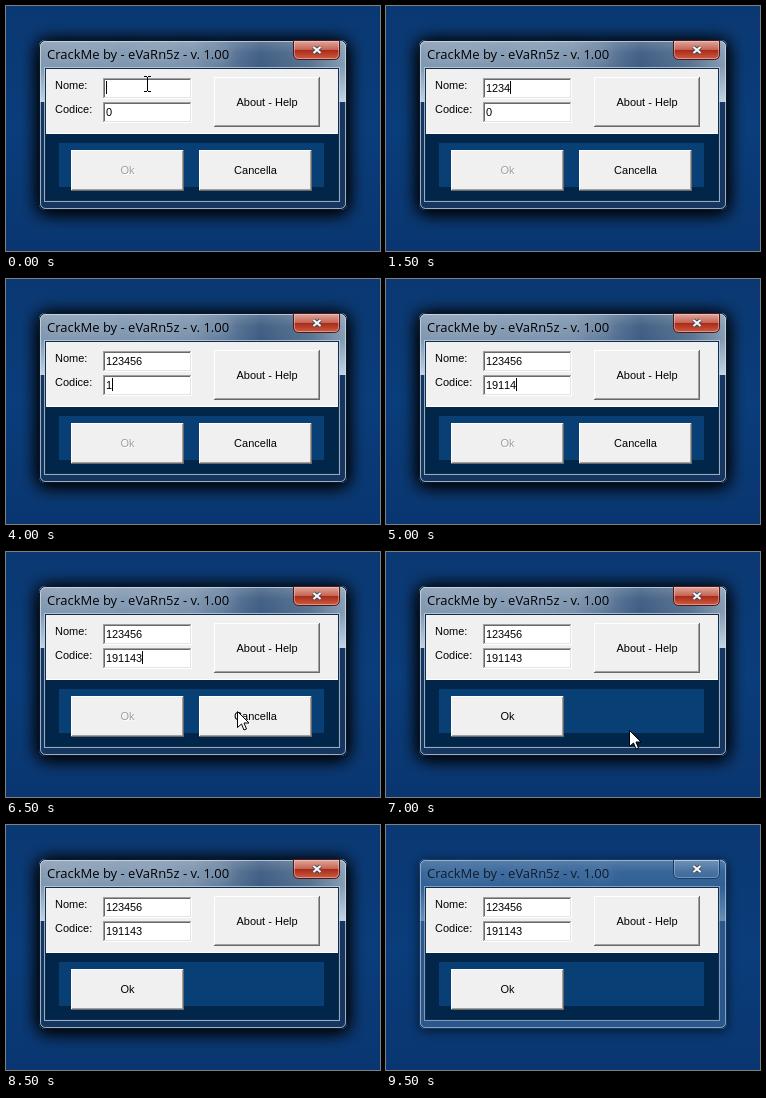
These frames come from a looping animation (374 px wide and 245 px high, 10000 ms). An HTML page with a canvas:

```html
<!DOCTYPE html>
<html lang="it">
<head>
<meta charset="utf-8">
<title>CrackMe</title>
<style>
html, body { margin: 0; width: 100%; height: 100%; overflow: hidden; background: #0a3a76; }
canvas { display: block; }
</style>
</head>
<body>
<canvas id="stage" width="374" height="245"></canvas>
<script>
const g = document.getElementById('stage').getContext('2d');
const LOOP = 10000;
const UI = '11px "Liberation Sans", Arial, sans-serif';
const FACE = '#f0f0f0';
const WIN = { x: 33, y: 34, w: 308, h: 170 };
const CLIENT = { x: 40, y: 63, w: 292, h: 131 };

// start, name digits, code, focus (1 name, 2 code, 3 code selected), pointer, x, y
const steps = [
  [0, 0, '0', 1, 'beam', 138, 70],
  [500, 0, '0', 0, 'beam', 138, 70],
  [1000, 2, '0', 1],
  [1500, 4, '0', 1],
  [2000, 6, '0', 1],
  [2500, 6, '0', 0, 'arrow', 90, 118],
  [3000, 6, '0', 2, 'beam', 95, 98],
  [3500, 6, '0', 3, 'beam', 72, 105],
  [4000, 6, '1', 2],
  [4500, 6, '191', 2],
  [5000, 6, '19114', 2],
  [5500, 6, '191143', 2],
  [6000, 6, '191143', 0, 'beam', 105, 97],
  [6500, 6, '191143', 2, 'arrow', 231, 159],
  [7000, 6, '191143', 0, 'arrow', 243, 178],
  [8000, 6, '191143', 0, 'arrow', 304, 155],
  [8500, 6, '191143', 0]
];

function rect(x, y, w, h, color) {
  g.fillStyle = color;
  g.fillRect(x, y, w, h);
}

function text(s, x, y, color = '#000', align = 'left') {
  g.font = UI;
  g.textAlign = align;
  g.fillStyle = color;
  g.fillText(s, x, y);
}

function gradient(x0, y0, x1, y1, stops) {
  const f = g.createLinearGradient(x0, y0, x1, y1);
  stops.forEach(([at, color]) => f.addColorStop(at, color));
  return f;
}

// rounded path around a box, shrunk by d on every side
function round({ x, y, w, h }, d, r) {
  g.beginPath();
  g.roundRect(x + d, y + d, w - 2 * d, h - 2 * d, r);
}

function outline(box, d, r, color) {
  round(box, d, r);
  g.lineWidth = 1;
  g.strokeStyle = color;
  g.stroke();
}

function bevel(x, y, w, h, [lightOut, lightIn, darkOut, darkIn], fill) {
  rect(x, y, w, h, darkOut);
  rect(x, y, w - 1, h - 1, lightOut);
  rect(x + 1, y + 1, w - 2, h - 2, darkIn);
  rect(x + 1, y + 1, w - 3, h - 3, lightIn);
  rect(x + 2, y + 2, w - 4, h - 4, fill);
}

function button(label, x, y, w, h, enabled = true) {
  bevel(x, y, w, h, ['#fff', FACE, '#696969', '#a0a0a0'], FACE);
  const cx = x + w / 2, by = y + Math.floor(h / 2) + 4;
  if (!enabled) text(label, cx + 1, by + 1, '#fff', 'center');
  text(label, cx, by, enabled ? '#000' : '#a0a0a0', 'center');
}

function field(value, y, caret, selected) {
  bevel(97, y, 89, 21, ['#a0a0a0', '#696969', '#fff', '#e3e3e3'], '#fff');
  const end = 100 + 6 * value.length;
  if (selected) rect(100, y + 3, end - 100, 13, '#3399ff');
  [...value].forEach((c, i) => text(c, 100 + 6 * i, y + 14, selected ? '#fff' : '#000'));
  if (caret) rect(end, y + 3, 1, 13, '#000');
}

function closeButton(active) {
  const box = { x: 287, y: 34, w: 47, h: 20 };
  round(box, 0.5, [0, 0, 5, 5]);
  g.fillStyle = active
    ? gradient(0, 35, 0, 54, [[0, '#dfa79c'], [0.45, '#c76555'], [0.5, '#ab2b19'], [1, '#cf6247']])
    : gradient(0, 35, 0, 54, [[0, 'rgba(255,255,255,.16)'], [1, 'rgba(255,255,255,.04)']]);
  g.fill();
  outline(box, 0.5, [0, 0, 5, 5], active ? '#431b20' : '#1c3c66');
  outline(box, 1.5, [0, 0, 4, 4], active ? 'rgba(255,220,210,.45)' : 'rgba(200,225,250,.35)');
  for (const [width, color] of [[4, '#414b5c'], [2.2, '#f7f7f7']]) {
    g.beginPath();
    g.moveTo(307.5, 41);
    g.lineTo(314.5, 47);
    g.moveTo(314.5, 41);
    g.lineTo(307.5, 47);
    g.lineWidth = width;
    g.strokeStyle = color;
    g.stroke();
  }
}

function shadow(active) {
  g.save();
  g.shadowColor = active ? '#000' : 'rgba(0,0,0,.6)';
  g.shadowBlur = active ? 18 : 12;
  g.shadowOffsetY = 2;
  g.fillStyle = '#15406f';
  round(WIN, 0, 6);
  g.fill();
  if (active) g.fill();
  g.restore();
}

function glass(active) {
  const { x, y, w, h } = WIN;
  g.save();
  round(WIN, 0, 6);
  g.clip();
  rect(x, y, w, h, active
    ? gradient(x, 0, x + w, 0, [[0, '#8096ae'], [0.5, '#7890aa'], [0.72, '#3d5c82'], [0.88, '#58728f'], [1, '#8a9fb5']])
    : '#2f5f95');
  rect(x, y, w, 29, gradient(0, y, 0, y + 29,
    [[0, 'rgba(255,255,255,.2)'], [0.45, 'rgba(255,255,255,.04)'], [1, 'rgba(255,255,255,0)']]));
  const sheen = active ? 0.75 : 0.35;
  rect(x, 60, w, 36, gradient(0, 60, 0, 96,
    [[0, 'rgba(215,232,245,0)'], [1, `rgba(215,232,245,${sheen})`]]));
  rect(x, 96, w, h, active ? '#16365f' : '#2b578b');
  g.restore();
  outline(WIN, 0.5, 6, active ? '#0a1626' : '#18365a');
  outline(WIN, 1.5, 5, active ? 'rgba(205,228,245,.7)' : 'rgba(190,215,238,.6)');
}

function caption(active) {
  g.save();
  g.font = '13px "Open Sans", "Noto Sans", sans-serif';
  g.textAlign = 'left';
  g.fillStyle = active ? '#000' : '#101c2c';
  g.shadowColor = active ? 'rgba(205,225,242,.9)' : 'rgba(150,185,220,.8)';
  g.shadowBlur = 12;
  g.fillText('CrackMe by - eVaRn5z - v. 1.00', 41, 53);
  g.restore();
}

function client(active) {
  const { x, y, w, h } = CLIENT;
  rect(x - 2, y - 2, w + 4, h + 4, active ? 'rgba(185,212,235,.75)' : 'rgba(170,200,228,.6)');
  rect(x - 1, y - 1, w + 2, h + 2, '#142c48');
  rect(x, y, w, 64, FACE);
  rect(x, y + 64, w, 1, '#fff');
  rect(x, y + 65, w, h - 65, '#02254a');
  rect(53, 137, 265, 44, '#083f75');
}

function beam(x, y) {
  for (const row of [y, y + 15]) {
    rect(x, row, 3, 1, '#000');
    rect(x + 4, row, 3, 1, '#000');
  }
  rect(x + 3, y + 1, 1, 14, '#000');
}

function arrow(x, y) {
  g.beginPath();
  [[0, 0], [0, 16], [4, 12.5], [6.5, 18.5], [9, 17.5], [6.5, 11.5], [11.5, 11.5]]
    .forEach(([dx, dy]) => g.lineTo(x + dx + 0.5, y + dy + 0.5));
  g.closePath();
  g.fillStyle = '#fff';
  g.fill();
  g.strokeStyle = '#000';
  g.lineWidth = 1;
  g.stroke();
}

function draw(t) {
  const [, typed, code, focus, pointer, px, py] = steps.findLast(s => s[0] <= t);
  const active = t < 9500;
  const solved = t >= 7000;

  rect(0, 0, 374, 245, gradient(0, 0, 0, 245, [[0, '#0a3872'], [0.5, '#0a3d7b'], [1, '#093670']]));
  shadow(active);
  glass(active);
  caption(active);
  closeButton(active);
  client(active);

  text('Nome:', 49, 83);
  text('Codice:', 49, 107);
  field('123456'.slice(0, typed), 72, focus === 1);
  field(code, 96, focus === 2, focus === 3);
  button('About - Help', 208, 71, 106, 50);
  button('Ok', 65, 144, 113, 41, solved);
  if (!solved) button('Cancella', 193, 144, 113, 41);

  if (pointer === 'beam') beam(px, py);
  if (pointer === 'arrow') arrow(px, py);
}

function tick() {
  draw(performance.now() % LOOP);
  requestAnimationFrame(tick);
}
tick();
</script>
</body>
</html>
```
